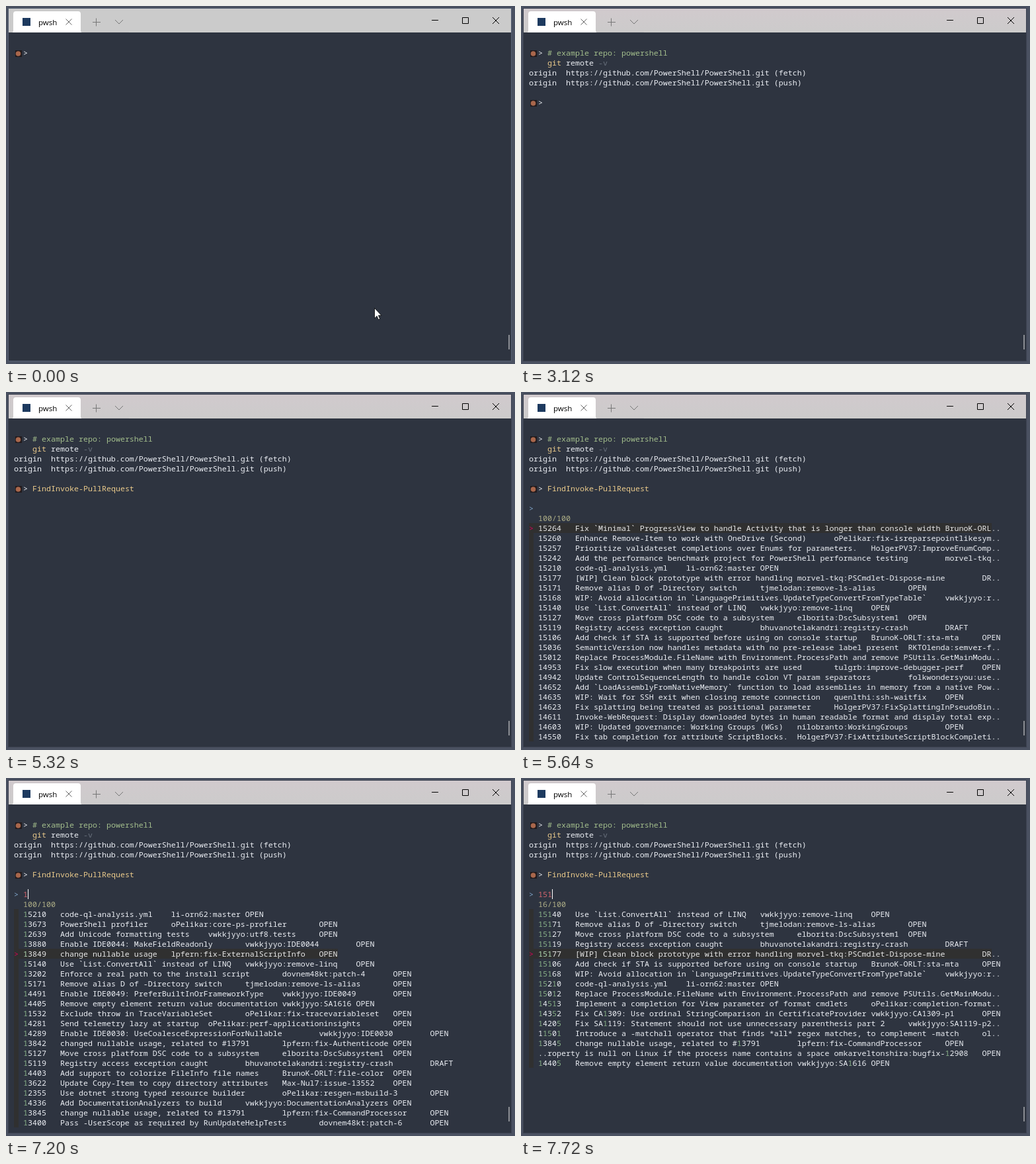
An HTML page for the animation above (8000 ms loop, 770 by 541 pixels).

```html
<!DOCTYPE html>
<html lang="en">
<head>
<meta charset="utf-8">
<title>Terminal</title>
<style>
html, body { margin: 0; width: 100%; height: 100%; overflow: hidden; background: #4a5161; }
svg { display: block; width: 770px; height: 541px; }
#term text {
  font: 500 11.667px "Noto Sans Mono", "DejaVu Sans Mono", monospace;
  font-variant-ligatures: none;
  white-space: pre;
}
.tab { font: 11.5px "Open Sans", "Noto Sans", sans-serif; }
</style>
</head>
<body>
<svg viewBox="0 0 770 541" xmlns="http://www.w3.org/2000/svg">
  <defs>
    <linearGradient id="warm" x2="0" y2="1">
      <stop offset="0" stop-color="#d1cacd"/>
      <stop offset="1" stop-color="#cccbcb"/>
    </linearGradient>
  </defs>
  <rect width="770" height="541" fill="#4a5161"/>
  <rect id="edge" x="3" y="3" width="762" height="534"/>
  <rect x="4" y="4" width="760" height="532" fill="#2e3440"/>
  <rect id="bar" x="4" y="4" width="760" height="36"/>
  <path d="M113 39.5H186" stroke="#c3c3c3"/>
  <path d="M9 40Q11 40 11 37V12Q11 8 15 8H109Q113 8 113 12V37Q113 40 115 40Z" fill="#fff"/>
  <rect x="25" y="18" width="12" height="12" fill="#1d3a5f"/>
  <text class="tab" x="49" y="29" fill="#000">pwsh</text>
  <g fill="none" stroke="#666">
    <path d="M90.5 19.5l9 9m0-9l-9 9"/>
    <path d="M131 24.5h12m-6.5-6v12M165 21l6 6 6-6" stroke="#777"/>
    <path d="M644 21.5h10M690.5 17.5h9v9h-9zM736 17l10 10m0-10l-10 10" stroke="#000"/>
  </g>
  <rect x="760" y="497" width="2" height="22" fill="#8b8e94"/>
  <g id="term"></g>
  <path id="mouse" d="M.5.5v15.5l3.6-3.4 2.3 5.4 2.3-1-2.3-5.3h4.6z" fill="#fff" stroke="#000" stroke-width=".8"/>
</svg>
<script>
const LOOP = 8000, CELL = 7, LINE = 15, LEFT = 12, TOP = 63, WIDTH = 100;
const WHITE = '#eceff4', GREEN = '#a3be8c', YELLOW = '#ebcb8b', GRAY = '#68707c';
const $ = id => document.getElementById(id);

// number|title|branch|state
const source = `
15264|Fix \`Minimal\` ProgressView to handle Activity that is longer than console width|BrunoK-ORLT:minimal|OPEN
15260|Enhance Remove-Item to work with OneDrive (Second)|oPelikar:fix-isreparsepointlikesymlink|OPEN
15257|Prioritize validateset completions over Enums for parameters.|HolgerPV37:ImproveEnumCompletion|OPEN
15242|Add the performance benchmark project for PowerShell performance testing|morvel-tkq:perf|OPEN
15210|code-ql-analysis.yml|li-orn62:master|OPEN
15177|[WIP] Clean block prototype with error handling|morvel-tkq:PSCmdlet-Dispose-mine|DRAFT
15171|Remove alias D of -Directory switch|tjmelodan:remove-ls-alias|OPEN
15168|WIP: Avoid allocation in \`LanguagePrimitives.UpdateTypeConvertFromTypeTable\`|vwkkjyyo:remove-alloc|OPEN
15140|Use \`List.ConvertAll\` instead of LINQ|vwkkjyyo:remove-linq|OPEN
15127|Move cross platform DSC code to a subsystem|elborita:DscSubsystem1|OPEN
15119|Registry access exception caught|bhuvanotelakandri:registry-crash|DRAFT
15106|Add check if STA is supported before using on console startup|BrunoK-ORLT:sta-mta|OPEN
15036|SemanticVersion now handles metadata with no pre-release label present|RKTOlenda:semver-fix|OPEN
15012|Replace ProcessModule.FileName with Environment.ProcessPath and remove PSUtils.GetMainModule|vwkkjyyo:path|OPEN
14953|Fix slow execution when many breakpoints are used|tulgrb:improve-debugger-perf|OPEN
14942|Update ControlSequenceLength to handle colon VT param separators|folkwondersyou:user-colon|OPEN
14652|Add \`LoadAssemblyFromNativeMemory\` function to load assemblies in memory from a native PowerShell host|oPelikar:load|OPEN
14635|WIP: Wait for SSH exit when closing remote connection|quenlthi:ssh-waitfix|OPEN
14623|Fix splatting being treated as positional parameter|HolgerPV37:FixSplattingInPseudoBinding|OPEN
14611|Invoke-WebRequest: Display downloaded bytes in human readable format and display total expected|oPelikar:web|OPEN
14603|WIP: Updated governance: Working Groups (WGs)|nilobranto:WorkingGroups|OPEN
14550|Fix tab completion for attribute ScriptBlocks.|HolgerPV37:FixAttributeScriptBlockCompletion|OPEN
13673|PowerShell profiler|oPelikar:core-ps-profiler|OPEN
12639|Add Unicode formatting tests|vwkkjyyo:utf8.tests|OPEN
13880|Enable IDE0044: MakeFieldReadonly|vwkkjyyo:IDE0044|OPEN
13849|change nullable usage|lpfern:fix-ExternalScriptInfo|OPEN
13202|Enforce a real path to the install script|dovnem48kt:patch-4|OPEN
14491|Enable IDE0049: PreferBuiltInOrFrameworkType|vwkkjyyo:IDE0049|OPEN
14405|Remove empty element return value documentation|vwkkjyyo:SA1616|OPEN
11532|Exclude throw in TraceVariableSet|oPelikar:fix-tracevariableset|OPEN
14281|Send telemetry lazy at startup|oPelikar:perf-applicationinsights|OPEN
14289|Enable IDE0030: UseCoalesceExpressionForNullable|vwkkjyyo:IDE0030|OPEN
13842|changed nullable usage, related to #13791|lpfern:fix-Authenticode|OPEN
14403|Add support to colorize FileInfo file names|BrunoK-ORLT:file-color|OPEN
13622|Update Copy-Item to copy directory attributes|Max-Nul7:issue-13552|OPEN
12355|Use dotnet strong typed resource builder|oPelikar:resgen-msbuild-3|OPEN
14336|Add DocumentationAnalyzers to build|vwkkjyyo:DocumentationAnalyzers|OPEN
13845|change nullable usage, related to #13791|lpfern:fix-CommandProcessor|OPEN
13400|Pass -UserScope as required by RunUpdateHelpTests|dovnem48kt:patch-6|OPEN
14513|Implement a completion for View parameter of format cmdlets|oPelikar:completion-formatview|OPEN
14352|Fix CA1309: Use ordinal StringComparison in CertificateProvider|vwkkjyyo:CA1309-p1|OPEN
14205|Fix SA1119: Statement should not use unnecessary parenthesis part 2|vwkkjyyo:SA1119-p2|OPEN
11501|Introduce a -matchall operator that finds *all* regex matches, to complement -match|olderan:matchall|OPEN
..roperty is null on Linux if the process name contains a space|omkarveltonshira:bugfix-12908|OPEN`;

// Fields sit on 8-column tab stops; long rows end in two dots.
function layOut(line) {
  const text = line.split('|').reduce((s, f) => s.padEnd((s.length >> 3) * 8 + 8) + f);
  return text.length > WIDTH ? text.slice(0, WIDTH - 2) + '..' : text;
}
const rows = {};
const all = source.trim().split('\n').map(line => {
  const key = line.startsWith('..') ? 'tail' : line.slice(0, 5);
  rows[key] = layOut(line);
  return key;
});
const keys = s => s.split(' ');
const lists = {
  '': all.slice(0, 22),
  '1': keys('15210 13673 12639 13880 13849 15140 13202 15171 14491 14405 11532 14281 14289 13842 15127 15119 14403 13622 12355 14336 13845 13400'),
  '15': keys('15210 15140 15171 15127 15119 15177 15106 15168 15260 15257 15242 15264 15036 15012 11532 11501 12355 13845 14405 14953 14635 14513'),
  '151': keys('15140 15171 15127 15119 15177 15106 15168 15210 15012 14513 14352 14205 11501 13845 tail 14405')
};
const counts = { '': 100, '1': 100, '15': 52, '151': 16 };

// Changes in order of time; each adds to the state before it.
const steps = [
  [0, { mouse: [557, 456], focus: 0, first: 0, output: 0, input: 0, caret: null, fzf: 0, query: '', pick: 0 }],
  [120, { focus: 1, mouse: [557, 400] }],
  [200, { mouse: [556, 290] }],
  [320, { mouse: [555, 210] }],
  [520, { caret: [0, 4] }],
  [640, { first: 1, caret: [0, 30] }],
  [760, { first: 2, caret: [1, 17] }],
  [1280, { caret: null }],
  [1520, { output: 1, mouse: null, caret: [5, 4] }],
  [2040, { caret: null }],
  [2600, { caret: [5, 4] }],
  [3120, { caret: null }],
  [3240, { input: 1, caret: [6, 17] }],
  [3480, { input: 2, caret: [5, 26] }],
  [4000, { caret: null }],
  [4560, { caret: [5, 26] }],
  [4760, { caret: [6, 0] }],
  [5320, { caret: null }],
  [5640, { fzf: 1 }],
  [5880, { caret: [7, 2] }],
  [5960, { caret: null }],
  [6400, { pick: 1, caret: [7, 2] }],
  [6520, { pick: 2 }],
  [6760, { pick: 3 }],
  [6840, { pick: 4 }],
  [7200, { query: '1', caret: [7, 3] }],
  [7520, { query: '15', caret: [7, 4] }],
  [7720, { query: '151', caret: [7, 5] }]
];

const px = col => LEFT + col * CELL;
const py = row => TOP + row * LINE;
const escape = s => s.replace(/&/g, '&amp;').replace(/</g, '&lt;').replace(/>/g, '&gt;');
const span = (s, color) => `<tspan fill="${color}">${escape(s)}</tspan>`;
const line = (row, col, spans) => `<text x="${px(col)}" y="${py(row) + 12}">${spans}</text>`;
const put = (row, col, s, color = WHITE) => line(row, col, span(s, color));
const box = (row, col, cols, color) =>
  `<rect x="${px(col)}" y="${py(row)}" width="${cols * CELL}" height="${LINE}" fill="${color}"/>`;

function prompt(row) {
  const y = py(row);
  return `<rect x="14" y="${y + 4}" width="10" height="10" fill="#211a1c"/>` +
    `<circle cx="18.5" cy="${y + 9}" r="3.8" fill="#a9674c"/>` + put(row, 2, '>');
}

function remoteCommand(row, lines) {
  let out = put(row, 4, '# example repo: powershell', GREEN);
  if (lines > 1) out += line(row + 1, 4, span('git', YELLOW) + span(' remote ', WHITE) + span('-v', GRAY));
  return out;
}

// Forward search finds the end of the match, backward search tightens it.
function matches(text, query) {
  let at = -1, n = 0;
  const found = [];
  for (; n < query.length; n++) {
    const next = text.indexOf(query[n], at + 1);
    if (next < 0) break;
    at = next;
  }
  for (let i = n - 1, from = at; i >= 0; i--) {
    from = text.lastIndexOf(query[i], from);
    found.push(from--);
  }
  return found;
}

function item(key, i, state) {
  const text = rows[key], row = 9 + i, picked = i === state.pick;
  const plain = picked ? '#e8e8e8' : WHITE, hit = picked ? '#afd7af' : '#87af87';
  let spans = '', from = 0;
  for (const m of matches(text, state.query).reverse()) {
    spans += span(text.slice(from, m), plain) + span(text[m], hit);
    from = m + 1;
  }
  spans += span(text.slice(from), plain);
  const shown = text.endsWith('..') ? text.length - 2 : text.length;
  return box(row, 0, picked ? shown + 2 : 1, '#303030') +
    (picked ? put(row, 0, '>', '#d70057') : '') + line(row, 2, spans);
}

function finder(state) {
  const { query } = state;
  return put(7, 0, '>', '#81a6cc') + put(7, 2, query, '#d0646c') +
    put(8, 2, counts[query] + '/100', '#afaf87') +
    lists[query].map((key, i) => item(key, i, state)).join('');
}

function terminal(state) {
  let out = prompt(0);
  if (state.first) out += remoteCommand(0, state.first);
  if (state.output) {
    const url = 'origin  https://github.com/PowerShell/PowerShell.git ';
    out += put(2, 0, url + '(fetch)') + put(3, 0, url + '(push)') + prompt(5);
  }
  if (state.input === 1) out += remoteCommand(5, 2);
  if (state.input === 2) out += put(5, 4, 'FindInvoke-PullRequest', YELLOW);
  if (state.fzf) out += finder(state);
  if (state.caret) {
    const [row, col] = state.caret;
    out += `<rect x="${px(col)}" y="${py(row)}" width="1" height="${LINE}" fill="#fff"/>`;
  }
  return out;
}

let shown = -1;
function paint(time) {
  const past = steps.filter(([at]) => at <= time);
  if (past.length === shown) return;
  shown = past.length;
  const state = Object.assign({}, ...past.map(s => s[1]));
  $('edge').setAttribute('fill', state.focus ? '#3b4150' : '#566072');
  $('bar').setAttribute('fill', state.focus ? 'url(#warm)' : '#cbcbcb');
  $('term').innerHTML = terminal(state);
  $('mouse').style.display = state.mouse ? '' : 'none';
  if (state.mouse) $('mouse').setAttribute('transform', `translate(${state.mouse})`);
}

function tick() {
  paint(performance.now() % LOOP);
  requestAnimationFrame(tick);
}
tick();
</script>
</body>
</html>
```
